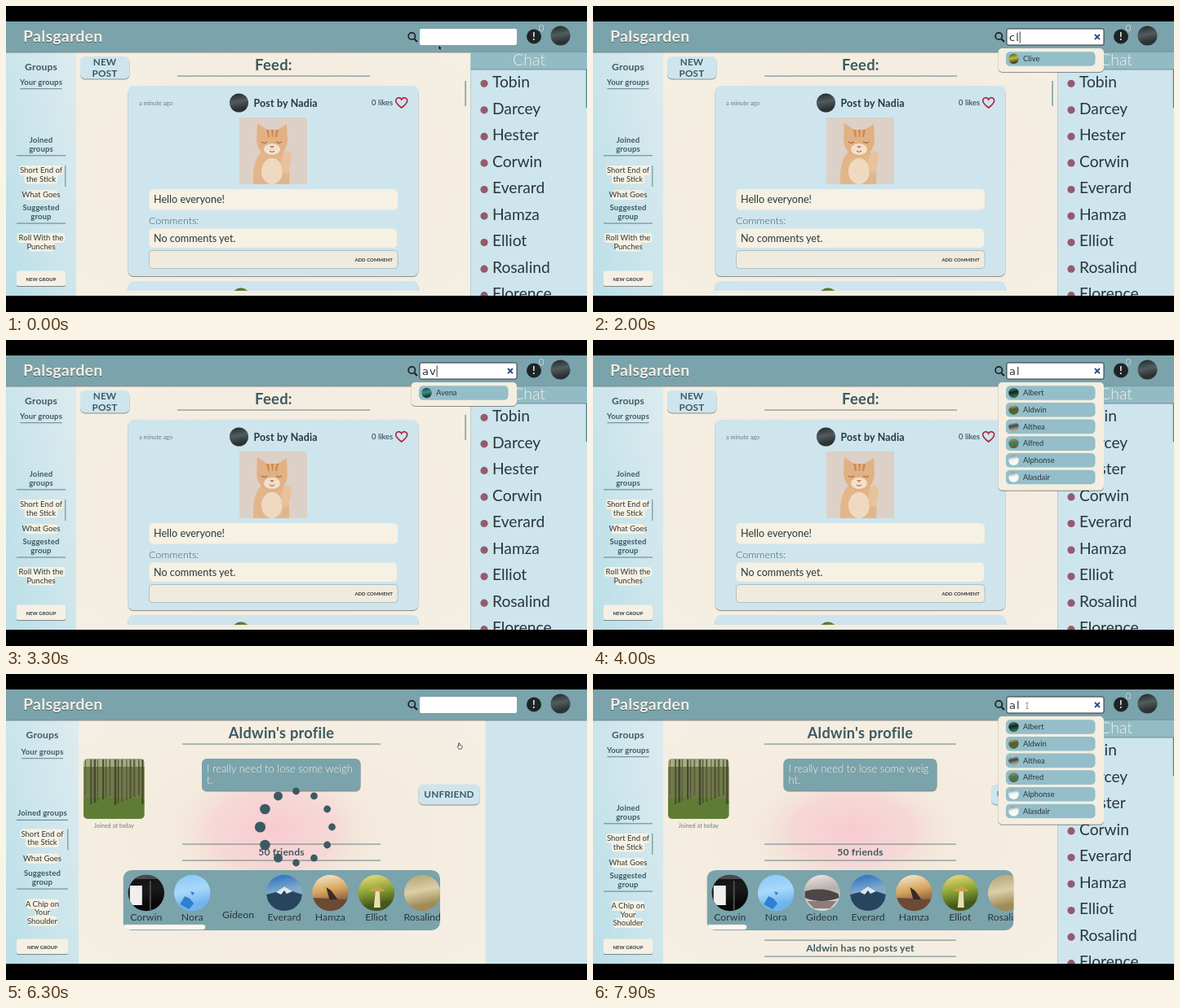
An HTML page for the animation above (8 s loop, 712 by 376 pixels).

```html
<!DOCTYPE html>
<html lang="en">
<head>
<meta charset="utf-8">
<title>Palsgarden</title>
<style>
  html, body { margin: 0; width: 100%; height: 100%; overflow: hidden; background: #000; }
  svg { display: block; width: 100vw; height: 100vh; }
  text { font-family: Lato, sans-serif; fill: #2a363a; white-space: pre; }
  .m { text-anchor: middle; }
  .e { text-anchor: end; }
  .b { font-weight: 700; letter-spacing: .015em; }
  .l { font-weight: 300; }
  .t { fill: #3c5a61; }
  .g { fill: #6f7c80; }
  .c { fill: #f6f0e3; }
  .input { font-family: "DejaVu Sans", sans-serif; letter-spacing: 1px; }
  .shade { filter: drop-shadow(0 1px .7px #0006); }
</style>
</head>
<body>
<svg id="stage" viewBox="0 0 712 376"></svg>
<script>
const LOOP = 8000, TEAL = '#7aa3ac', SKY = '#cee5ee', CREAM = '#f6f1e3', INK = '#3c5a61';
const stage = document.getElementById('stage');
const $ = id => document.getElementById(id);
const show = (id, on) => $(id).setAttribute('display', on ? 'inline' : 'none');

const text = (x, y, size, s, cls = '') =>
  `<text x="${x}" y="${y}" font-size="${size}" class="${cls}">${s}</text>`;
const rect = (x, y, w, h, r, fill, extra = '') =>
  `<rect x="${x}" y="${y}" width="${w}" height="${h}" rx="${r}" fill="${fill}" ${extra}/>`;
const disc = (x, y, r, fill) => `<circle cx="${x}" cy="${y}" r="${r}" fill="${fill}"/>`;
const rule = (x1, x2, y) => rect(x1, y - .4, x2 - x1, .9, 0, '#55757c');
const group = (id, body, extra = '') => `<g id="${id}" ${extra}>${body}</g>`;

// Soft gradients that stand in for photos
const tones = {
  night: ['#283033', '#525c5e', '#2b3233'],
  bird: ['#3f6d3a', '#d9b32f', '#41512b'],
  sea: ['#1f4a52', '#3c8f84', '#1c3a3e'],
  lake: ['#4f7f7c', '#12241f', '#2f6a4a'],
  wood: ['#b4bf93', '#5a5a35', '#4d6a2c'],
  dusk: ['#d8d6cf', '#3a454c', '#a9a78c'],
  reef: ['#b98a3c', '#3f7d6b', '#5b6a35'],
  snow: ['#87959b', '#f3f4f4', '#fafafa'],
  ink: ['#111', '#1b1b1c', '#080808'],
  sky: ['#8ecbf8', '#a9d8fa', '#6fb4ee'],
  gray: ['#e4dfdb', '#b5aeab', '#d8d3ce'],
  peak: ['#3578c4', '#7fa8cc', '#8fb0cb'],
  beach: ['#f0dfbb', '#d6a45c', '#7a563c'],
  moss: ['#e0d471', '#8ea435', '#43561c'],
  sand: ['#b9aa7c', '#dccfa6', '#a08c58']
};
const details = {
  ink: '<path d="M-22-22H22V-17H-22ZM4-15H6V22H4Z" fill="#4a4a4a"/><path d="M-20-9H-5V15H-20Z" fill="#f0efed"/>',
  sky: '<path d="M-15 14L-9 4L-3 7L2 13L-4 20ZM-2-2l5 2-3 3Z" fill="#2f7fd0"/>',
  gray: '<path d="M-21-2Q0-8 20 1L21 6Q0 14-21 6Z" fill="#4b4747"/><path d="M-18 10H18L10 19H-10Z" fill="#8c7d77"/>',
  peak: '<path d="M-22 2L-10-1L0-8L10-2L22 2Q20 22 0 22T-22 2Z" fill="#28455f"/><path d="M-10-1L0-8L10-2L3 1L0-3L-4 2Z" fill="#dbe6ee"/>',
  beach: '<path d="M-21 6L21 8Q16 22 0 22T-21 6Z" fill="#6b4a36"/><path d="M-5-7L1-3L9 8H-1Z" fill="#392a24"/>',
  moss: '<path d="M-3 18L-1-3H4L5 18Z" fill="#e8deb0"/><path d="M-9-2Q0-14 11-2Z" fill="#c7a24b"/>'
};
const photo = (x, y, r, tone) => disc(x, y, r, `url(#${tone})`);
const defs = `<defs>
  ${Object.entries(tones).map(([id, c]) => `<linearGradient id="${id}" x2=".2" y2="1">
    ${c.map((k, i) => `<stop offset="${.1 + i * .4}" stop-color="${k}"/>`).join('')}</linearGradient>`).join('')}
  <linearGradient id="side" x1="0" y1=".9" x2="1" y2=".1"><stop stop-color="#bcdfe8"/><stop offset="1" stop-color="#dcebef"/></linearGradient>
  <radialGradient id="paper" r=".7"><stop stop-color="#f3e9da"/><stop offset="1" stop-color="#f5efe4"/></radialGradient>
  <radialGradient id="blush"><stop stop-color="#f8cbd0"/><stop offset=".55" stop-color="#f6d5d6" stop-opacity=".85"/><stop offset="1" stop-color="#f4e8da" stop-opacity="0"/></radialGradient>
  <clipPath id="body"><rect y="56" width="712" height="300"/></clipPath>
  <clipPath id="feedClip"><rect x="86" y="56" width="484" height="294"/></clipPath>
</defs>`;

const header = rect(0, 19, 712, 37.5, 0, TEAL, 'class="shade"') +
  text(21, 44, 19.5, 'Palsgarden', 'b c shade') +
  '<path d="M500.5 40.5L504 44" stroke="#1b2224" stroke-width="2.2"/>' +
  '<circle cx="497.3" cy="37" r="4.2" fill="none" stroke="#1b2224" stroke-width="1.7"/>' +
  rect(507, 28, 119, 20, 2, '#fff', 'id="box" stroke="#2d3336"') +
  text(510, 42.5, 13, '', 'input').replace('<text', '<text id="query"') +
  rect(0, 31.5, .9, 14, 0, '#222', 'id="caret"') +
  '<path id="clear" d="M615 35l6 6m0-6l-6 6" stroke="#2a4a8c" stroke-width="1.8"/>' +
  disc(647, 37.5, 9, '#1d2427') + text(647, 42, 13, '!', 'm b c') +
  photo(679.5, 36.5, 12, 'night');

function sidebar(id, mid, rows) {
  const [your, joined, sticks, suggested, picks, button] = rows;
  const half = mid - 13;
  const lines = (words, y, cls) => words.map((w, i) => {
    const width = w.length * 4.5;
    return (cls ? '' : rect(mid - width / 2, y - 9 + i * 10.5, width, 12, 4, CREAM)) +
      text(mid, y + i * 10.5, 9.5, w, 'm ' + cls);
  }).join('');
  const lastJoined = joined.y + (joined.words.length - 1) * 10.5;
  return group(id,
    rect(0, 56, mid * 2, 300, 0, 'url(#side)') +
    text(mid, 79, 12, 'Groups', 'm b t') +
    text(mid, your, 9.5, 'Your groups', 'm b t') + rule(mid - 25.5, mid + 25.5, your + 4.7) +
    lines(joined.words, joined.y, 'b t') + rule(13, 13 + half * 2, lastJoined + 5.3) +
    lines(['Short End of', 'the Stick'], sticks, '') + lines(['What Goes'], sticks + 30.3, '') +
    rect(13 + half * 2 - 1, sticks - 9, 1.4, 26, 0, TEAL) +
    lines(['Suggested', 'group'], suggested, 'b t') + rule(13, 13 + half * 2, suggested + 16) +
    lines(picks.words, picks.y, '') +
    rect(13, button, half * 2, 18.5, 2, '#f6f0e4', 'class="shade"') +
    text(mid, button + 12, 5.9, 'NEW GROUP', 'm b'));
}
const joined2 = { words: ['Joined', 'groups'], y: 168 };
const chip = ['A Chip on', 'Your', 'Shoulder'];
const sidebars =
  sidebar('sideFeed', 43, [97, joined2, 205, 251, { words: ['Roll With the', 'Punches'], y: 288 }, 325.5]) +
  sidebar('sideLoad', 44.5, [99, { words: ['Joined groups'], y: 174 }, 199.5, 248, { words: chip, y: 285.5 }, 325.5]) +
  sidebar('sideProfile', 43, [97, joined2, 205, 251, { words: chip, y: 288 }, 325.5]);

const cat = rect(286, 137, 83, 82, 0, '#ddd0c6') +
  `<path d="M303 219Q302 190 312 180H340Q349 195 347 219Z" fill="#e2b68b"/>
  <path d="M307 164L308 144L320 152H333L344 145L345 165Q343 185 326 186Q309 184 307 164Z" fill="#e2b183"/>
  <path d="M319 152h3l1 9h-2zm6 0h3l-1 9h-1zm6 0h3l-2 9h-2z" fill="#c98a54"/>
  <ellipse cx="326" cy="203" rx="13" ry="16" fill="#efd9c0"/>
  <ellipse cx="326" cy="176" rx="10" ry="7" fill="#f2e0cd"/>
  <path d="M338 203Q336 182 344 178Q352 180 349 192L345 206Z" fill="#e9c29a"/>
  <path d="M313 167q4 3 7 0m11 0q4 3 7 0M323 178q3 3 6 0" fill="none" stroke="#8a5a3a"/>
  <path d="M323 172h6l-3 3z" fill="#c9776b"/>`;

const feed = group('feed',
  rect(86, 56, 484, 300, 0, 'url(#paper)') +
  rect(91, 62, 60.5, 27.5, 6, SKY, 'class="shade"') +
  text(121, 73, 11.7, 'NEW', 'm b t') + text(121, 86.5, 11.7, 'POST', 'm b t') +
  text(328, 79, 18.4, 'Feed:', 'm b t') + rule(210, 446, 86) +
  `<g clip-path="url(#feedClip)">
    ${rect(149.5, 98, 356, 234, 7, SKY, 'class="shade"')}
    ${rect(149.5, 338, 356, 60, 7, SKY, 'class="shade"')}${photo(288, 358, 11.5, 'bird')}</g>` +
  text(163, 121.5, 7.3, 'a minute ago', 'g') + photo(285.5, 119, 11.5, 'night') +
  text(303.5, 123.5, 12.4, 'Post by Nadia', 'b') + text(448, 122, 9.5, '0 likes') +
  '<path d="M484.7 125C480 121.5 477.5 119 477.7 116C478.3 112 483 111.5 484.7 115C486.4 111.5 491.2 112 491.7 116C491.9 119 489.4 121.5 484.7 125Z" fill="none" stroke="#b0203f" stroke-width="1.6"/>' +
  cat +
  rect(175.5, 225, 304.5, 25.5, 5, CREAM) + text(181, 242, 12.6, 'Hello everyone!') +
  text(175, 268, 12.5, 'Comments:', 'l t') +
  rect(175.5, 273.5, 303.5, 23.5, 5, CREAM) + text(181, 289.7, 12.6, 'No comments yet.') +
  rect(175.5, 300.5, 304.5, 22, 4, '#f1ebde', 'stroke="#a3b4b5" stroke-width=".8"') +
  text(474, 313.5, 5.9, 'ADD COMMENT', 'b e') +
  rect(562.3, 92, 1.6, 31, 0, TEAL));

const forest = (x, y) => {
  let s = rect(x, y, 74.5, 74, 5, '#a3ae80') + rect(x, y + 10, 74.5, 46, 0, '#6f7b4a') +
    rect(x, y + 48, 74.5, 26, 5, '#5f7c35');
  for (let i = 0; i < 15; i++)
    s += rect(x + 2 + i * 4.9 + i * 5 % 3 * .7, y + 1, 1 + (i * 7 % 5) * .4, 44 + (i * 11 % 13), 0,
      i % 3 ? '#3f3b29' : '#5a5338', 'opacity=".8"');
  return s;
};

const friends = [['Corwin', 'ink'], ['Nora', 'sky'], ['Gideon', 'gray'], ['Everard', 'peak'],
  ['Hamza', 'beach'], ['Elliot', 'moss'], ['Rosalind', 'sand']];

function profile(id, loading) {
  const left = loading ? 89 : 86, mid = loading ? 337.5 : 327.5, half = loading ? 121.5 : 117.5;
  const photoX = loading ? 95 : 92, noteX = loading ? 240 : 233.5;
  const panelX = loading ? 143.5 : 139.5, panelW = loading ? 388.5 : 376, buttonX = loading ? 505.5 : 488;
  const line = y => rule(mid - half, mid + half, y);
  const note = 'I really need to lose some weight.', cut = loading ? 32 : 31;
  const people = friends.map(([name, tone], i) => {
    const x = panelX + 28.3 + i * 56.4, missing = loading && i === 2;
    return (missing ? '' : photo(x, 269, 22.2, tone) +
      `<g transform="translate(${x} 269)" clip-path="url(#round)">${details[tone] || ''}</g>`) +
      text(x, missing ? 299.5 : 302.5, 12.3, name, 'm');
  }).join('');
  return group(id,
    rect(left, 56, loading ? 498.5 : 484, 300, 0, 'url(#paper)') +
    `<ellipse cx="${mid - 10}" cy="192" rx="135" ry="${loading ? 88 : 78}" fill="url(#blush)"/>` +
    text(mid, 79, 18.2, "Aldwin's profile", 'm b t') + line(86) +
    forest(photoX, 104) + text(photoX + 37.3, 189, 7.3, 'Joined at today', 'm g') +
    rect(noteX, 104, loading ? 194.5 : 188, 39.5, 6, TEAL, 'class="shade"') +
    text(noteX + 6, 121, 13, note.slice(0, cut), 'l c') + text(noteX + 6, 134.5, 13, note.slice(cut), 'l c') +
    rect(buttonX, 135.5, 75, 25, 6, SKY, 'class="shade"') +
    text(buttonX + 37.5, 152, 11.7, 'UNFRIEND', 'm b t') +
    line(209) + text(mid, 223.3, 12.2, '50 friends', 'm b t') + line(229) +
    `<clipPath id="${id}Clip">${rect(panelX, 241, panelW, 74, 10, '#000')}</clipPath>` +
    `<g clip-path="url(#${id}Clip)">${rect(panelX, 241, panelW, 74, 10, TEAL)}${people}` +
    rect(panelX, 307.7, loading ? 101 : 49, 6.6, 3.3, '#fbf8f2', 'stroke="#8a9a9c" stroke-width=".5"') + '</g>' +
    (loading ? group('spinner', '') :
      line(327) + text(mid, 341.3, 12.2, 'Aldwin has no posts yet', 'm b t') + line(347)));
}

const chat = group('chat',
  text(656, 31, 11.5, '0', 'm l c') +
  rect(569.5, 57, 143, 20.5, 0, '#92bbc6', 'class="shade"') + text(641, 73, 19.5, 'Chat', 'm l c') +
  rect(569, 57, .8, 299, 0, '#a8c4cc') +
  `<g clip-path="url(#body)">` +
  ['Tobin', 'Darcey', 'Hester', 'Corwin', 'Everard', 'Hamza', 'Elliot', 'Rosalind', 'Florence'].map((name, i) =>
    disc(586, 95.3 + i * 32.55, 4.6, '#955b6b') + text(596, 100 + i * 32.55, 19.2, name)).join('') + '</g>' +
  rect(710.8, 78, 1.2, 47, 0, '#557a85'));

const pointers =
  group('arrow', '<path d="M0-2V4.5L1.6 3L2.8 5.4L3.8 5L2.7 2.6H4.8Z" fill="#111" stroke="#fff" stroke-width=".4"/>') +
  group('beam', '<path d="M-1.5-3.5H1.5M0-3.5V3.5M-1.5 3.5H1.5" stroke="#777" stroke-width=".8"/>') +
  group('hand', '<path d="M-1.5 1V-3Q-.7-4-.1-3V-.8L2.5 0Q3.5.7 3 2L2 4.2H-1L-3 1.2Q-2.6.2-1.5 1Z" fill="#fff" stroke="#333" stroke-width=".8"/>');

stage.innerHTML = defs + `<clipPath id="round">${disc(0, 0, 22.2)}</clipPath>` +
  rect(0, 0, 712, 376, 0, '#000') + rect(0, 56, 712, 300, 0, SKY) +
  feed + profile('loading', true) + profile('profile', false) + sidebars + header + chat +
  group('menu', '') + pointers + rect(0, 356, 712, 20, 0, '#000');

const people = [['Clive', 'bird'], ['Avena', 'sea'], ['Albert', 'lake'], ['Aldwin', 'wood'],
  ['Althea', 'dusk'], ['Alfred', 'reef'], ['Alphonse', 'snow'], ['Alasdair', 'snow']];
const typing = [[0, ''], [1450, 'c'], [1700, 'cl'], [2350, 'c'], [2500, ''], [2700, 'a'], [2900, 'av'],
  [3330, 'a'], [3480, 'al'], [6300, ''], [7200, 'a'], [7350, 'al']];
const path = [[0, 530, 50], [500, 531, 40], [4700, 532, 39], [5000, 545, 90], [5250, 550, 160], [5400, 552, 147],
  [5500, 554, 109], [5700, 556, 88], [6450, 556, 88], [6900, 532, 39], [LOOP, 532, 39]];

function pointerAt(t) {
  const i = Math.max(1, path.findIndex(p => p[0] > t));
  const [t0, x0, y0] = path[i - 1], [t1, x1, y1] = path[i];
  const k = (t - t0) / (t1 - t0);
  return [x0 + (x1 - x0) * k, y0 + (y1 - y0) * k];
}

const rowY = i => 65 + i * 20.7;
let shown = null;
function setQuery(value) {
  if (value === shown) return;
  shown = value;
  $('query').textContent = value;
  const hits = value ? people.filter(([name]) => name.toLowerCase().startsWith(value)) : [];
  $('menu').innerHTML = !hits.length ? '' :
    rect(496.5, 52, 129.5, 8.3 + hits.length * 20.75, 5, '#f4eee1', 'class="shade"') +
    hits.map(([name, tone], i) => `<g class="row">${rect(506, rowY(i) - 8.8, 109.5, 17.6, 5, '#94bec9')}
      ${photo(515.5, rowY(i), 6.2, tone)}${text(527, rowY(i) + 3.3, 9.4, name)}</g>`).join('');
}

function drawSpinner(t) {
  const turn = Math.PI + (t - 6300) / 1200 * 2 * Math.PI;
  $('spinner').innerHTML = Array.from({ length: 12 }, (_, i) => {
    const a = i * Math.PI / 6;
    return disc(355.5 + 44 * Math.cos(a), 188 + 44 * Math.sin(a), 4.4 + 2.2 * Math.max(0, Math.cos(a - turn)), INK);
  }).join('');
}

function draw(t) {
  const isFeed = t < 6300, isLoading = !isFeed && t < 6650, isProfile = t >= 6650;
  show('feed', isFeed); show('sideFeed', isFeed);
  show('loading', isLoading); show('sideLoad', isLoading);
  show('profile', isProfile); show('sideProfile', isProfile);
  show('chat', !isLoading);
  if (isLoading) drawSpinner(t);

  const [keyTime, value] = typing.filter(k => k[0] <= t).pop();
  setQuery(value);
  const focusTime = isFeed ? 700 : 7000, focused = t >= focusTime;
  $('box').setAttribute('stroke-opacity', focused ? 1 : 0);
  show('clear', value);
  const blink = Math.min(t, isFeed ? 6000 : LOOP) - Math.max(keyTime, focusTime);
  show('caret', focused && blink % 1000 < 500);
  $('caret').setAttribute('x', 510 + (value ? $('query').getComputedTextLength() : 0));

  const hoverY = pointerAt(Math.max(0, t - 100))[1];
  stage.querySelectorAll('.row').forEach((row, i) => {
    const near = t > 4700 && isFeed ? Math.max(0, 1 - Math.abs(hoverY - rowY(i)) / 18) : 0;
    const s = 1 + .04 * near, y = rowY(i);
    row.setAttribute('transform', `translate(560.7 ${y}) scale(${s}) translate(-560.7 ${-y})`);
  });

  const [x, y] = pointerAt(t);
  const visible = t < 1400 || t > 4700;
  const kind = y < 47 ? 'beam' : t > 4700 && t < 6600 && y > 52 ? 'hand' : 'arrow';
  for (const id of ['arrow', 'beam', 'hand']) {
    show(id, visible && id === kind);
    $(id).setAttribute('transform', `translate(${x} ${y})`);
  }
}

function frame() {
  draw(performance.now() % LOOP);
  requestAnimationFrame(frame);
}
frame();
</script>
</body>
</html>
```
